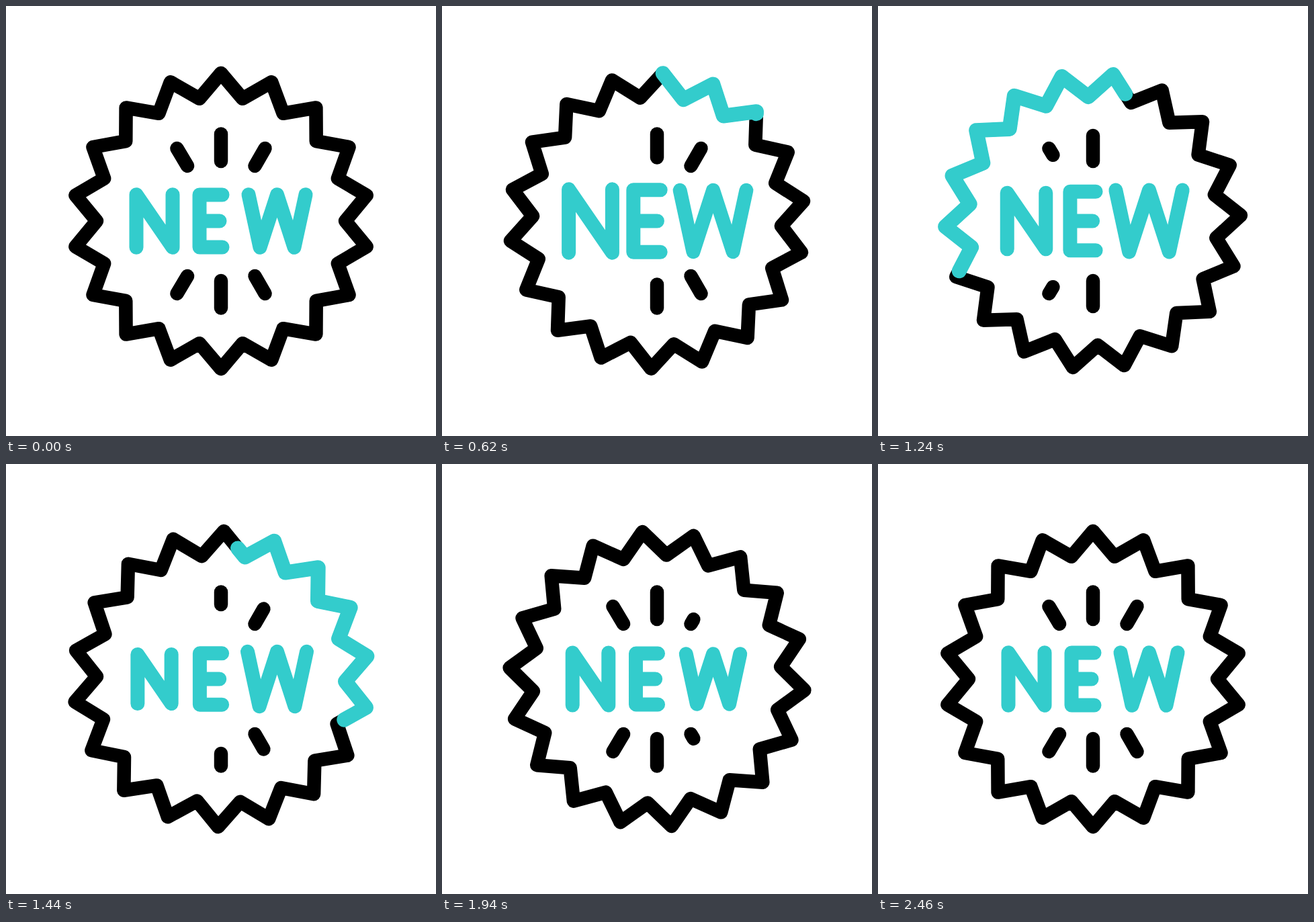
These frames come from a looping animation (640 by 640 pixels, 3020 ms). An HTML page:

```html
<!DOCTYPE html>
<html lang="en">
<head>
<meta charset="utf-8">
<title>New badge</title>
<style>
  html, body { margin: 0; width: 100%; height: 100%; overflow: hidden; background: #fff; }
  svg { display: block; width: 100%; height: 100%; }
  path { fill: none; stroke: #000; stroke-width: 20.5; stroke-linecap: round; stroke-linejoin: round; }
  .teal { stroke: #3cc; stroke-width: 21; }
  #snake { stroke-width: 22; }
</style>
</head>
<body>
<svg viewBox="0 0 640 640">
  <g id="star">
    <path id="rim"/>
    <path id="snake" class="teal" pathLength="1"/>
  </g>
  <g id="rays"></g>
  <g id="word"></g>
</svg>
<script>
const LOOP = 3020, STEP = 20, C = 320;
const $ = id => document.getElementById(id);
const clamp = x => Math.min(1, Math.max(0, x));
const mix = (a, b, k) => a + (b - a) * k;
const ramp = (t, from, len) => clamp((t - from) / len);
const smooth = x => x * x * (3 - 2 * x);
const soft = x => (x + smooth(x)) / 2;
const line = pts => 'M' + pts.map(p => p.join(' ')).join('L');

function addPath(parent, cls) {
  const p = document.createElementNS('http://www.w3.org/2000/svg', 'path');
  if (cls) p.setAttribute('class', cls);
  return parent.appendChild(p);
}

// Ease with flat ends; x1 and x2 are the time handles.
function ease(x, x1, x2) {
  let lo = 0, hi = 1;
  for (let i = 0; i < 30; i++) {
    const s = (lo + hi) / 2, q = 1 - s;
    if (3 * q * q * s * x1 + 3 * q * s * s * x2 + s * s * s < x) lo = s; else hi = s;
  }
  return smooth(lo);
}

// Star with 18 tips, starting at the top, clockwise
const rim = [];
for (let i = 0; i <= 36; i++) {
  const a = i * Math.PI / 18, r = i % 2 ? 185 : 220;
  rim.push([(C + r * Math.sin(a)).toFixed(2), (C - r * Math.cos(a)).toFixed(2)]);
}
$('rim').setAttribute('d', line(rim) + 'Z');
$('snake').setAttribute('d', line(rim));

// Letters: centre x and strokes relative to the centre
const letters = [
  { x: 221, strokes: [[[-27, 39.3], [-27, -39.3], [27, 39.3], [27, -39.3]]] },
  { x: 305, strokes: [[[17, -39], [-17, -39], [-17, 39], [17, 39]], [[-17, 0], [13, 0]]] },
  { x: 403.5, strokes: [[[-42.5, -39.3], [-25.5, 39.3], [0, -39.3], [25.5, 39.3], [42.5, -39.3]]] }
].map((l, i) => ({ ...l, delay: i * 80, el: addPath($('word'), 'teal') }));

// Rays: inner and outer end, mirrored below the word
const rays = [];
[[270, 238, 254.5, 212], [320, 231, 320, 190.5], [370.5, 238, 385.5, 212]].forEach((p, i) => {
  for (const flip of [false, true]) rays.push({ p, flip, delay: i * 218, el: addPath($('rays')) });
});

function angle(t) {
  if (t < 372) return -6 * smooth(t / 372);
  if (t < 2230) return mix(-6, 182, ease((t - 372) / 1858, 0.376, 0.538));
  return mix(182, 180, smooth(ramp(t, 2230, 230)));
}

function letterScale(t) {
  return 1 + 0.2 * smooth(ramp(t, 0, 640))
           - 0.3 * smooth(ramp(t, 960, 600))
           + 0.1 * smooth(ramp(t, 1560, 460));
}

function drawStar(t) {
  $('star').setAttribute('transform', `rotate(${angle(t).toFixed(3)} ${C} ${C})`);
  const head = soft(ramp(t, 454, 1048)), tail = soft(ramp(t, 758, 1048)), snake = $('snake');
  snake.style.display = head > tail ? '' : 'none';
  snake.setAttribute('stroke-dasharray', `${head - tail} 2`);
  snake.setAttribute('stroke-dashoffset', -tail);
}

function drawLetter(l, t) {
  const k = letterScale(t - l.delay);
  l.el.setAttribute('d', l.strokes.map(s => line(s.map(([x, y]) => [l.x + x * k, C + y * k]))).join(''));
}

// Each ray wipes away from the inside, then grows back from the inside, twice.
function drawRay(r, t) {
  const u = t - r.delay, second = u >= 1065;
  const cut = ramp(u, second ? 1092 : 370, 238);
  const grow = ramp(u, second ? 1445 : 808, 228);
  const from = grow > 0 ? 0 : cut, to = grow > 0 ? grow : 1;
  r.el.style.display = from < to ? '' : 'none';
  const [x0, y0, x1, y1] = r.p;
  const at = k => {
    const y = mix(y0, y1, k);
    return [mix(x0, x1, k), r.flip ? 2 * C - y : y];
  };
  r.el.setAttribute('d', line([at(from), at(to)]));
}

function draw(ms) {
  const t = Math.floor((ms % LOOP) / STEP) * STEP;
  drawStar(t);
  letters.forEach(l => drawLetter(l, t));
  rays.forEach(r => drawRay(r, t));
}

const start = performance.now();
function tick() {
  draw(performance.now() - start);
  requestAnimationFrame(tick);
}
tick();
</script>
</body>
</html>
```
